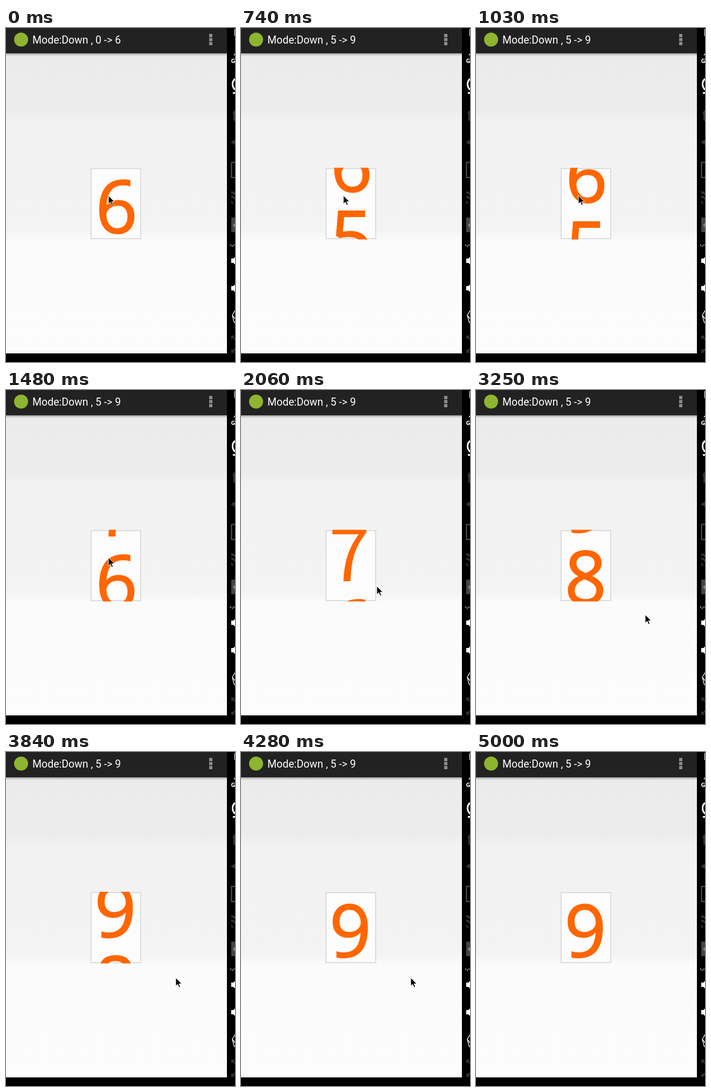
Write an HTML page that moves like this. It is 425 by 620 pixels and loops after 5350 ms.

```html
<!DOCTYPE html>
<html lang="en">
<head>
<meta charset="utf-8">
<title>Scrolling number</title>
<style>
  html, body { margin: 0; width: 100%; height: 100%; overflow: hidden; background: #000; }
  svg { display: block; width: 425px; height: 620px; }
  .title { font: 19.5px Roboto, sans-serif; fill: #fff; }
  .digit { font: 136px "Open Sans", "Noto Sans", sans-serif; fill: #ff6600; stroke: #ff6600; stroke-width: 2; }
  .seven { font: 137px "Noto Sans CJK SC", "Noto Sans CJK JP", "Noto Sans CJK", sans-serif; stroke-width: 0; }
</style>
</head>
<body>
<svg viewBox="0 0 425 620">
  <defs>
    <linearGradient id="page" gradientUnits="userSpaceOnUse" x1="0" y1="48" x2="0" y2="604">
      <stop offset="0" stop-color="#ebebeb"/>
      <stop offset=".19" stop-color="#ececec"/>
      <stop offset=".225" stop-color="#f2f2f2"/>
      <stop offset=".585" stop-color="#f3f3f3"/>
      <stop offset=".625" stop-color="#fbfbfb"/>
      <stop offset="1" stop-color="#fcfcfc"/>
    </linearGradient>
    <linearGradient id="shade" x1="0" y1="0" x2="0" y2="1">
      <stop offset="0" stop-color="#000" stop-opacity=".3"/>
      <stop offset="1" stop-color="#000" stop-opacity="0"/>
    </linearGradient>
    <clipPath id="window"><rect x="158" y="259.5" width="92" height="133"/></clipPath>
  </defs>

  <rect width="425" height="620"/>
  <rect y="47" width="410" height="557" fill="url(#page)"/>
  <rect width="410" height="47" fill="#222"/>
  <rect y="47" width="410" height="5" fill="url(#shade)"/>
  <circle cx="28" cy="21.5" r="13" fill="#8db52f"/>
  <text id="title" class="title" x="49" y="29"></text>
  <path d="M377 11h6v6h-6zM377 18.5h6v6h-6zM377 26h6v6h-6z" fill="#8c8c8c"/>

  <!-- toolbar cut off by the right edge -->
  <g fill="#fff">
    <rect x="424" y="2" width="1" height="13"/>
    <path d="M422 51l3-4v3z"/>
    <text x="417.5" y="65" font-family="Open Sans, sans-serif" font-size="11" font-weight="700">G</text>
    <path d="M425 93q-6 3-6 11t6 12v-4q-3-3-3-8t3-7zM421 119h4v3h-4z"/>
    <path d="M418 428h4l3-3v14l-3-3h-4zM418 479h4l3-3v14l-3-3h-4z"/>
    <path d="M416 402h2v2h-2zM419 404h2v2h-2zM422 402h2v2h-2z" fill="#aaa"/>
  </g>
  <g fill="#333">
    <path d="M421 156l4-4v20h-3v-11h-1zM417 212l8-5v10z"/>
    <path d="M418 303q5 0 7 3v4q-3-3-7-3zM418 311q4 0 7 4v4q-3-4-7-4zM418 320l5 6h-5z"/>
    <rect x="418" y="352" width="7" height="27" fill="#444"/>
    <path d="M421 366l4-4v8z" fill="#888"/>
    <path d="M418 571h7l-3 3 3 3v2l-5-3-2 2zM418 603v-7l2 2 5-3v3l-3 3 2 2z"/>
  </g>
  <path d="M426 249.500h-7.500v28h7.500" fill="none" stroke="#555" stroke-width="2"/>
  <path d="M426 523l-6 10 3 12 3 4M420 533l6 8" fill="none" stroke="#fff" stroke-width="1.300"/>

  <rect x="158" y="261" width="92" height="130" fill="#fcfcfc" stroke="#dcdcdc" stroke-width="2"/>
  <g clip-path="url(#window)"><g id="reel"></g></g>
  <path id="cursor" d="M0 0v15.500l3.600-3.300 2.600 5.800 2.500-1.100-2.600-5.600h5z" stroke="#fff" stroke-width="1"/>
</svg>
<script>
  const LOOP = 5350, START = 445, STEP = 146.77;
  const PITCH = 133, BASE = 380.7;
  const lefts = { 5: 166.2, 6: 166.2, 7: 163, 8: 164.6, 9: 164 };

  // [step, digits scrolled past 5]
  const scroll = [[1, .12], [3, .42], [8, 1.18], [16, 2.436], [20, 3.12], [24, 3.722], [26, 4]];
  // [step, x, y]
  const pointer = [[10, 190, 311], [14, 314, 417], [20, 314, 417], [24, 315, 419],
    [28, 315, 419], [29, 330, 474], [30, 361, 550], [31, 388, 602], [32, 430, 640]];

  const $ = id => document.getElementById(id);
  const title = $('title'), reel = $('reel'), cursor = $('cursor');

  for (const n in lefts) {
    const el = document.createElementNS('http://www.w3.org/2000/svg', 'text');
    el.setAttribute('class', n === '7' ? 'digit seven' : 'digit');
    el.setAttribute('x', lefts[n]);
    el.setAttribute('y', BASE - (n - 5) * PITCH);
    el.textContent = n;
    reel.append(el);
  }

  // Linear lookup of one column, held flat outside the table
  function at(table, step, col = 1) {
    const i = table.findIndex(row => row[0] >= step);
    if (i < 0) return table[table.length - 1][col];
    if (i === 0) return table[0][col];
    const a = table[i - 1], b = table[i];
    return a[col] + (b[col] - a[col]) * (step - a[0]) / (b[0] - a[0]);
  }

  const move = (el, x, y) => el.setAttribute('transform', `translate(${x} ${y})`);

  function draw(t) {
    const step = t < START ? 0 : Math.min(32, 1 + Math.floor((t - START) / STEP));
    title.textContent = step ? 'Mode:Down , 5 -> 9' : 'Mode:Down , 0 -> 6';
    move(reel, 0, PITCH * (step ? at(scroll, step) : 1));
    move(cursor, at(pointer, step), at(pointer, step, 2));
  }

  const t0 = performance.now();
  function tick() {
    draw((performance.now() - t0) % LOOP);
    requestAnimationFrame(tick);
  }
  tick();
</script>
</body>
</html>
```
